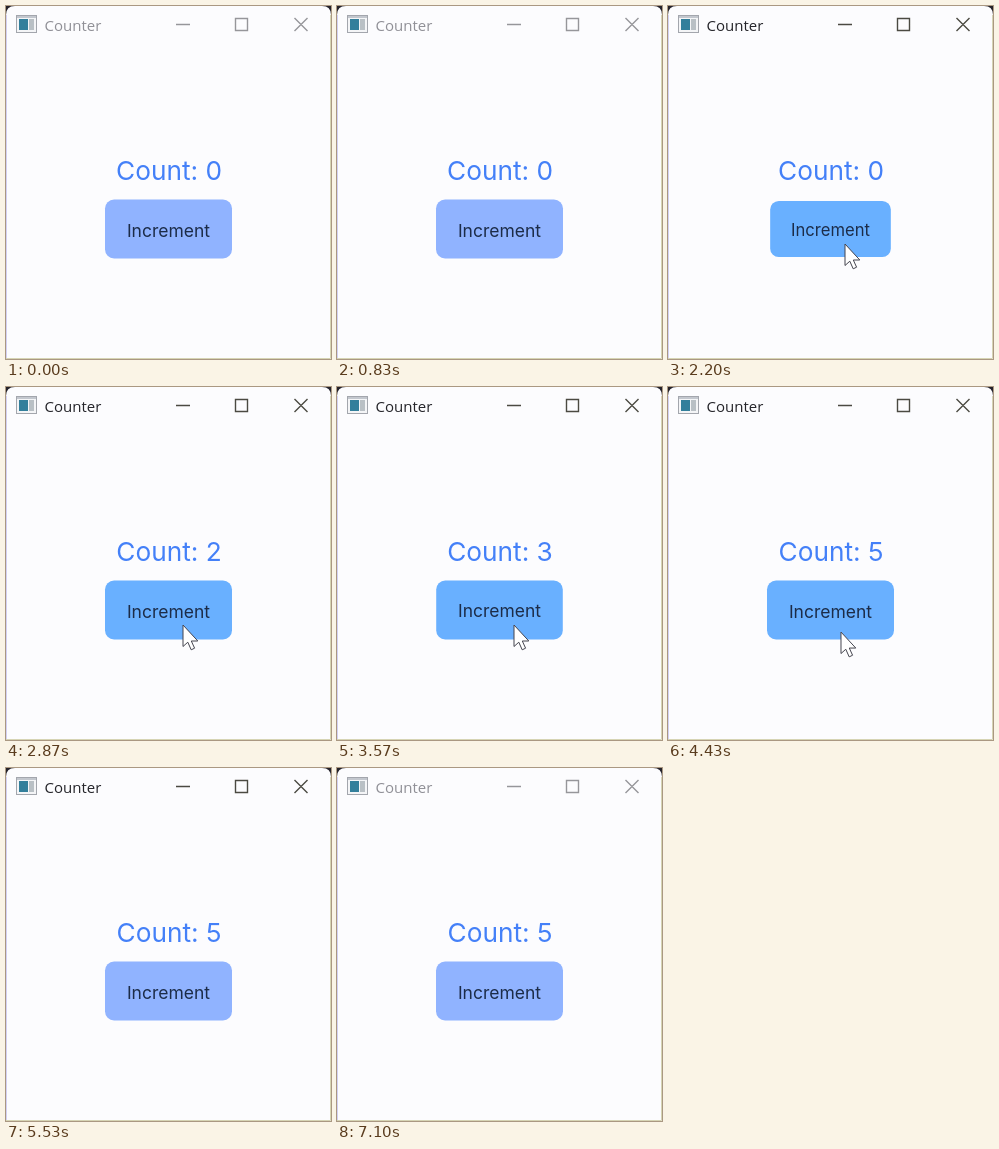
Recreate the animation shown at these times as an HTML page. Size 325 by 353 pixels, loop 7.23 s.

```html
<!DOCTYPE html>
<html lang="en">
<head>
<meta charset="utf-8">
<title>Counter</title>
<style>
  html, body { margin: 0; width: 100%; height: 100%; overflow: hidden; background: #25232b; }
  svg { display: block; width: 325px; height: 353px; }
  #title { font: 15px "Open Sans", "Noto Sans", sans-serif; }
  #count { font: 26.25px Inter, sans-serif; fill: #4480f8; }
  #label { font: 17.5px Inter, sans-serif; fill: #1c2c48; }
</style>
</head>
<body>
<svg viewBox="0 0 325 353">
  <path d="M0 353V9Q0 0 9 0H316Q325 0 325 9V353Z" fill="#fcfcfe"/>
  <path d="M.5 9V353" stroke="#d2d0f3"/>
  <path d="M324.5 9V352.5H0" fill="none" stroke="#d6d4b4"/>

  <g id="icon">
    <rect x="10.5" y="9.5" width="20" height="17" fill="#f4f5f7" stroke="#a3a6ad"/>
    <path d="M11 11H30" stroke="#c3c7ce" stroke-width="2"/>
    <rect x="13" y="13" width="9" height="11" fill="#337f9b"/>
    <rect x="23" y="13" width="5" height="11" fill="#b9c0c5"/>
  </g>
  <g id="chrome">
    <text id="title" x="38.5" y="24.5">Counter</text>
    <path id="controls" fill="none" stroke-width="1.4"
      d="M170 18.5H184M229.5 12.5H241.5V24.5H229.5ZM288.5 12L301.5 25M301.5 12L288.5 25"/>
  </g>

  <text id="count" x="163" y="174" text-anchor="middle"></text>
  <g id="button">
    <rect id="face" x="99" y="193.5" width="127" height="59" rx="9"/>
    <text id="label" x="162.5" y="230.5" text-anchor="middle">Increment</text>
  </g>
  <path id="cursor" d="M0 0V21.5L4.8 17.2L8.2 24.8L11.6 23.2L8.3 16H14.8Z"
    fill="#fff" stroke="#45454f" stroke-linejoin="round"/>
</svg>
<script>
const LOOP = 7230;
const FIRST_PRESS = 2120, PRESS_GAP = 480, HOLD = 160, CLICKS = 5;
const IDLE = [144, 179, 255], HOVER = [105, 176, 255];
// time, x, y of the pointer tip
const PATH = [
  [830, 194, 354], [1010, 182, 252], [1130, 180, 248], [1450, 177, 238],
  [4300, 177, 238], [4430, 173, 245], [4500, 172, 249], [4850, 168, 354]
];

const $ = id => document.getElementById(id);
const ramp = (t, start, length) => {
  const p = Math.min(1, Math.max(0, (t - start) / length));
  return p * p * (3 - 2 * p);
};
const pulse = (t, from, to, length) => ramp(t, from, length) - ramp(t, to, length);
const mix = (a, b, p) => a + (b - a) * p;

function pointerAt(t) {
  const i = PATH.findIndex(key => key[0] > t);
  if (i < 1) return [0, 400];
  const [t0, x0, y0] = PATH[i - 1], [t1, x1, y1] = PATH[i];
  const p = (t - t0) / (t1 - t0);
  return [mix(x0, x1, p), mix(y0, y1, p)];
}

function draw(t) {
  const active = t >= FIRST_PRESS && t < 7000;
  $("title").style.fill = active ? "#25252a" : "#909097";
  $("controls").style.stroke = active ? "#4b4a42" : "#96969a";

  let count = 0, press = 0;
  for (let i = 0; i < CLICKS; i++) {
    const down = FIRST_PRESS + i * PRESS_GAP;
    press += pulse(t, down, down + HOLD, 70);
    if (t >= down + HOLD) count++;
  }
  $("count").textContent = "Count: " + count;

  const hover = pulse(t, 1010, 4520, 110);
  $("face").style.fill = `rgb(${IDLE.map((c, i) => mix(c, HOVER[i], hover))})`;
  $("button").setAttribute("transform",
    `translate(162.5 223) scale(${1 - 0.05 * press}) translate(-162.5 -223)`);
  $("cursor").setAttribute("transform", `translate(${pointerAt(t)})`);
}

const start = performance.now();
function tick() {
  draw((performance.now() - start) % LOOP);
  requestAnimationFrame(tick);
}
tick();
</script>
</body>
</html>
```
